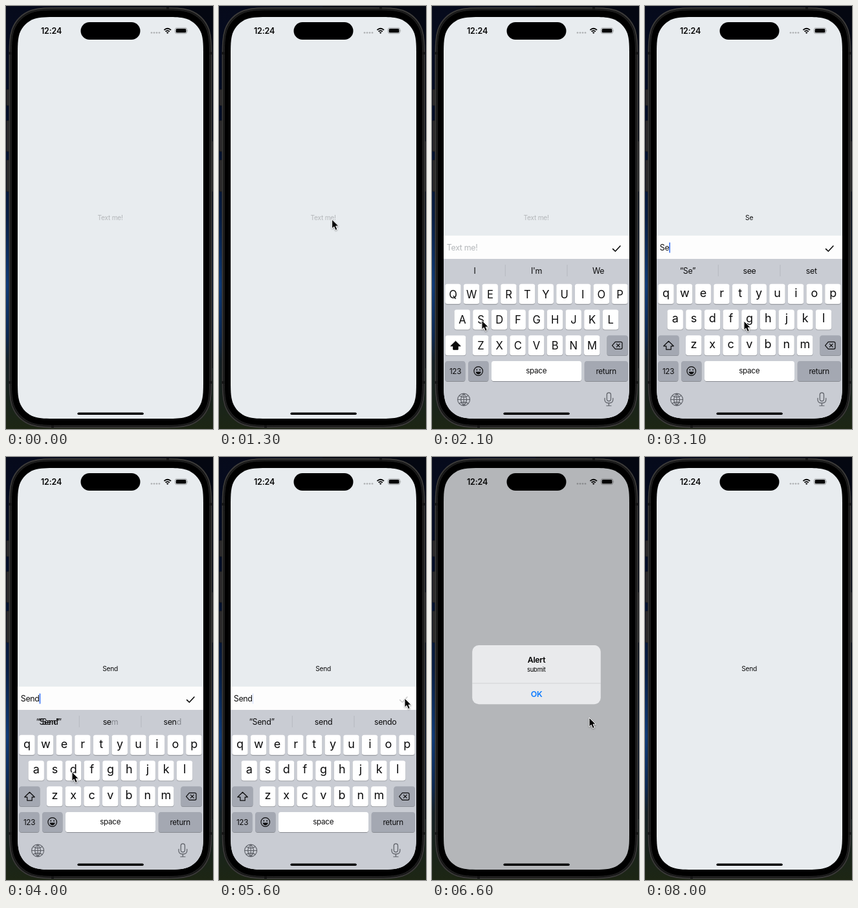
Write an HTML page that moves like this. It is 320 px wide and 654 px high and loops after 9.7 s.

```html
<!DOCTYPE html>
<html lang="en">
<head>
<meta charset="utf-8">
<title>Message input with keyboard</title>
<style>
html, body { margin: 0; width: 100%; height: 100%; overflow: hidden; background: #030a1a; }
svg { display: block; width: 320px; height: 654px; }
text { font-family: Inter, "Liberation Sans", sans-serif; letter-spacing: -.025em; white-space: pre; }
.mid { text-anchor: middle; }
.line { fill: none; stroke-linecap: round; stroke-linejoin: round; }
</style>
</head>
<body>
<svg id="stage" viewBox="0 0 320 654"></svg>
<script>
const LOOP = 9700, STEP = 100;
const INK = '#0b0b0c', GREY = '#b4b7ba', SPECIAL = '#a4a8b2';

const rect = (x, y, w, h, r, fill, more = '') =>
  `<rect x="${x}" y="${y}" width="${w}" height="${h}" rx="${r}" fill="${fill}" ${more}/>`;
const text = (x, y, size, str, more = '') =>
  `<text x="${x}" y="${y}" font-size="${size}" ${more}>${str}</text>`;
const mid = (x, y, size, str, more = '') => text(x, y, size, str, 'class="mid" ' + more);
const line = (d, color, width, more = '') =>
  `<path class="line" d="${d}" stroke="${color}" stroke-width="${width}" ${more}/>`;
const key = (x, y, w, fill) =>
  rect(x, y + .9, w, 31, 3.6, '#888b91') + rect(x, y, w, 31, 3.6, fill);

// Rectangle with continuous-curvature corners; offsets are in units of r.
function smoothRect(x, y, w, h, r, fill, more = '') {
  const curve = [[1.529, 0], [1.088, 0], [.868, 0], [.631, .075], [.373, .169]];
  const corner = [...curve, ...curve.map(([a, b]) => [b, a]).reverse()];
  const place = (pts, right, low) => pts.map(([a, b]) =>
    [right ? x + w - a * r : x + a * r, low ? y + h - b * r : y + b * r].join(' '));
  const back = [...corner].reverse();
  const parts = [place(corner, 0, 0), place(back, 0, 1), place(corner, 1, 1), place(back, 1, 0)];
  const d = parts.map((p, i) => (i ? 'L' : 'M') + p[0] + 'C' + p.slice(1).join(' ')).join('');
  return `<path d="${d}Z" fill="${fill}" ${more}/>`;
}

const rows = [['QWERTYUIOP', 32.4, 429.8], ['ASDFGHJKL', 46.7, 469.4], ['ZXCVBNM', 75.2, 509.2]];
const PITCH = 28.67;

function letters(lower) {
  return rows.map(([chars, x, y]) => [...chars].map((c, i) =>
    mid(x + i * PITCH, y + (lower ? 19.8 : 21.8), lower ? 18 : 16.6, lower ? c.toLowerCase() : c)
  ).join('')).join('');
}

const caps = rows.map(([chars, x, y]) => [...chars].map((c, i) =>
  key(x + i * PITCH - 12.2, y, 24.4, '#fff')).join('')).join('');

const arrowUp = 'M36.5 518.2L28.8 525.8H32.8V531.2H40.2V525.8H44.2Z';

const phone = `
  ${rect(0, 0, 320, 654, 0, 'url(#night)')}
  ${rect(160, 0, 160, 560, 0, '#04060e', 'opacity=".7"')}
  ${[[129, 25], [177, 48], [238, 49]].map(([y, h]) =>
    rect(.7, y, 6, h, 1.2, '#2b2a2b', 'stroke="#111" stroke-width=".6"')).join('')}
  ${rect(316, 209, 3.8, 78, 1, '#2b2a2b')}
  ${smoothRect(4.5, 2, 314, 650.5, 54, '#171717')}
  ${smoothRect(5.4, 2.9, 312.2, 648.7, 53, 'none', 'stroke="#3d3c3b" stroke-width="1.6"')}
  ${smoothRect(8.4, 6, 306.2, 642.5, 50, '#000', 'stroke="#252525" stroke-width="1"')}
  ${[[4.5, 71], [314.5, 71], [4.5, 580], [314.5, 580], [248, 2], [70, 648]]
    .map(([x, y]) => rect(x, y, 4, 4, 0, '#151515')).join('')}
  ${smoothRect(18, 17, 287, 621, 40.2, '#e8ecef')}`;

const status = `
  ${text(54, 43, 12.5, '12:24', 'font-weight="600" fill="#060606" style="letter-spacing:-.015em"')}
  ${rect(115.5, 25, 92, 27, 13.5, '#000')}
  ${[225, 229, 233, 237].map(x => `<circle cx="${x}" cy="41.3" r="1.35" fill="#000" opacity=".24"/>`).join('')}
  ${line('M244.4 37.2Q249.7 32.4 255 37.2M246.6 39.5Q249.7 36.8 252.8 39.5', '#000', 1.8, 'style="stroke-linecap:butt"')}
  <path d="M247.9 41Q249.7 39.6 251.5 41L249.7 43Z"/>
  ${rect(261.4, 33.8, 18.3, 8.8, 2.7, 'none', 'stroke="#000" stroke-opacity=".4" stroke-width=".8"')}
  ${rect(262.7, 35.1, 15.7, 6.2, 1.6, '#000')}
  <path d="M280.6 36.7Q281.9 38.2 280.6 39.7Z" opacity=".45"/>`;

const keyboard = `
  ${rect(18, 355, 287, 36, 0, '#fdfdfd')}
  ${rect(18, 391, 287, 290, 0, '#c9ccd3')}
  ${text(22.8, 378, 12.4, '', 'id="field"')}
  ${rect(52, 365.6, 1.5, 16.2, .7, '#2f6df6', 'id="caret"')}
  ${line('M279.6 375.6L283.4 379.3L291 371', '#000', 1.5, 'id="check"')}
  ${rect(112.8, 400, .8, 18, 0, '#b2b5bc')}${rect(208.6, 400, .8, 18, 0, '#b2b5bc')}
  ${[66, 161.5, 257.2].map((x, i) => mid(x, 414, 12.4, '', `id="hint${i}"`)).join('')}
  ${mid(66, 414, 12.4, '“Sen”', 'id="ghost"')}
  ${caps}
  <g id="upper">${letters(false)}</g>
  <g id="lower">${letters(true)}</g>
  ${key(20.4, 509.2, 32, SPECIAL)}
  <g id="shiftOn">${rect(20.4, 509.2, 32, 31, 3.6, '#fff')}<path d="${arrowUp}" stroke="#000" stroke-linejoin="round"/></g>
  <g id="shiftOff">${line(arrowUp, INK, 1.2)}</g>
  ${key(270.5, 509.2, 32.3, SPECIAL)}
  ${line('M283.3 519.3H292Q294 519.3 294 521.3V528.3Q294 530.3 292 530.3H283.3L278.6 524.8ZM285.4 522.4L290.2 527.2M290.2 522.4L285.4 527.2', INK, 1.2)}
  ${key(20.4, 549, 31, SPECIAL)}${mid(36, 568.8, 11.7, '123')}
  ${key(56.2, 549, 31.2, SPECIAL)}
  <circle cx="71.7" cy="564.5" r="6.8" class="line" stroke="${INK}" stroke-width="1.2"/>
  <circle cx="69.3" cy="562.4" r="1"/><circle cx="74.1" cy="562.4" r="1"/>
  <path d="M67.6 565.6H75.8Q75 569.4 71.7 569.4T67.6 565.6Z"/>
  ${key(92, 549, 139, '#fff')}${mid(161.2, 567.8, 11.7, 'space')}
  ${key(235.8, 549, 67, SPECIAL)}${mid(269.2, 568.6, 11.7, 'return')}
  ${line('M39.6 608.5a9.5 9.5 0 1 0 19 0a9.5 9.5 0 1 0 -19 0H58.6M49.1 599V618M49.1 599Q40.4 608.5 49.1 618Q57.8 608.5 49.1 599M41.9 602.6Q49.1 606.6 56.3 602.6M41.9 614.4Q49.1 610.4 56.3 614.4', '#5b5e65', 1.1)}
  ${rect(270.3, 597.8, 6.2, 13, 3.1, 'none', 'stroke="#5b5e65" stroke-width="1.2"')}
  ${line('M267 606.4V608.4Q267 613.9 273.4 613.9T279.8 608.4V606.4M273.4 613.9V618M269.8 618H277', '#5b5e65', 1.2)}`;

const alertBox = `
  ${rect(62.2, 291, 198.6, 91.2, 10, '#e9eaec')}
  ${rect(62.2, 349.6, 198.6, .7, 0, '#c6c7ca')}
  ${mid(161.5, 317.7, 12.4, 'Alert', 'font-weight="600" fill="#000"')}
  ${mid(161.3, 332, 9.5, 'submit', 'fill="#000"')}
  ${mid(161.5, 371.2, 12.4, 'OK', 'font-weight="600" fill="#0a7aff"')}`;

const stage = document.getElementById('stage');
stage.innerHTML = `
  <defs>
    <linearGradient id="night" x2="0" y2="1">
      <stop stop-color="#060a1b"/><stop offset=".3" stop-color="#030e28"/>
      <stop offset=".5" stop-color="#071d42"/><stop offset=".66" stop-color="#0e3a76"/>
      <stop offset=".78" stop-color="#0b2750"/><stop offset=".84" stop-color="#141f24"/>
      <stop offset="1" stop-color="#1d2614"/>
    </linearGradient>
    <clipPath id="screen">${smoothRect(18, 17, 287, 621, 40.2, '#000')}</clipPath>
  </defs>
  ${phone}
  <g clip-path="url(#screen)" fill="${INK}">
    ${mid(161.1, 331.2, 10.2, '', 'id="label"')}
    <g id="keyboard">${keyboard}</g>
    ${rect(18, 17, 287, 621, 0, '#080308', 'id="dim"')}
    ${status}
    ${rect(110.4, 628.4, 102.4, 3.6, 1.8, '#000')}
    <g id="alert">${alertBox}</g>
  </g>
  <path id="pointer" d="M0 0V14.2L3.2 11.2L5.5 16.6L8.3 15.4L6 10.2H10.3Z" stroke="#fff" stroke-width="1"
    style="filter:drop-shadow(0 1px 1px rgba(0,0,0,.35))"/>`;

const $ = id => document.getElementById(id);
const show = (id, a) => $(id).setAttribute('opacity', a);

// time, x, y of the pointer tip
const path = [
  [500, 326, 440], [1100, 174.6, 330], [1500, 174.6, 330], [2100, 77, 486], [2300, 77, 486],
  [2700, 88, 448], [2900, 88, 448], [3300, 218, 526], [3500, 218, 526], [3900, 102, 487],
  [4300, 102, 487], [5100, 287, 373], [6300, 287, 373], [6600, 243, 403], [7000, 164, 365],
  [7800, 164, 365], [8000, 330, 420]
];
// time, typed text, suggestions
const typing = [
  [0, '', ['I', 'I\'m', 'We']],
  [2300, 'S', ['“S”', 'so', 'she']],
  [2900, 'Se', ['“Se”', 'see', 'set']],
  [3500, 'Sen', ['“Sen”', 'sem', 'send']],
  [3900, 'Send', ['“Send”', 'send', 'sendo']]
];

const clamp = v => Math.max(0, Math.min(1, v));
const ramp = (t, a, b) => clamp((t - a) / (b - a));
const easeOut = p => 1 - (1 - p) ** 3;
const smooth = p => p * p * (3 - 2 * p);

function pointerAt(t) {
  const i = path.findIndex(p => p[0] > t);
  if (i < 1) return null;
  const [t0, x0, y0] = path[i - 1], [t1, x1, y1] = path[i];
  const p = smooth(ramp(t, t0, t1));
  return [x0 + (x1 - x0) * p, y0 + (y1 - y0) * p];
}

function draw(t) {
  const [, typed, hints] = typing.findLast(s => s[0] <= t);
  for (const id of ['label', 'field']) {
    $(id).textContent = typed || 'Text me!';
    $(id).setAttribute('fill', typed ? INK : GREY);
  }

  const blink = (t - 3900) % 1000;
  const lit = t < 3900 ? 1 : Math.max(1 - ramp(blink, 500, 740), ramp(blink, 880, 1000));
  show('caret', typed ? lit : 0);
  if (typed) $('caret').setAttribute('x', 22.9 + $('field').getComputedTextLength());

  const mixing = t >= 3900 && t < 4100;
  hints.forEach((h, i) => {
    const el = $('hint' + i);
    if (mixing && i) {
      const [head, tail] = i === 1 ? ['se', 'm'] : ['sen', 'd'];
      el.innerHTML = `${head}<tspan fill="#85888f">${tail}</tspan>`;
    } else el.textContent = h;
  });
  show('ghost', mixing ? 1 : 0);

  show('upper', typed ? 0 : 1);
  show('shiftOn', typed ? 0 : 1);
  show('lower', typed ? 1 : 0);
  show('shiftOff', typed ? 1 : 0);
  show('check', t >= 5500 && t < 5800 ? .2 : 1);

  const up = easeOut(ramp(t, 1400, 1900)) - easeOut(ramp(t, 5700, 6100));
  $('keyboard').setAttribute('transform', `translate(0 ${(1 - up) * 284})`);
  $('keyboard').style.display = up > 0 ? '' : 'none';

  const open = easeOut(ramp(t, 5700, 6000)), shut = smooth(ramp(t, 7200, 7600));
  const k = 1.15 - .15 * open;
  show('dim', .23 * open * (1 - shut));
  show('alert', open * (1 - shut));
  $('alert').setAttribute('transform', `translate(161.5 336.6) scale(${k}) translate(-161.5 -336.6)`);

  const at = pointerAt(t);
  show('pointer', at ? 1 : 0);
  if (at) $('pointer').setAttribute('transform', `translate(${at[0]} ${at[1]})`);
}

const start = performance.now();
function tick() {
  const t = (performance.now() - start) % LOOP;
  draw(Math.floor(t / STEP) * STEP);
  requestAnimationFrame(tick);
}
tick();
</script>
</body>
</html>
```
